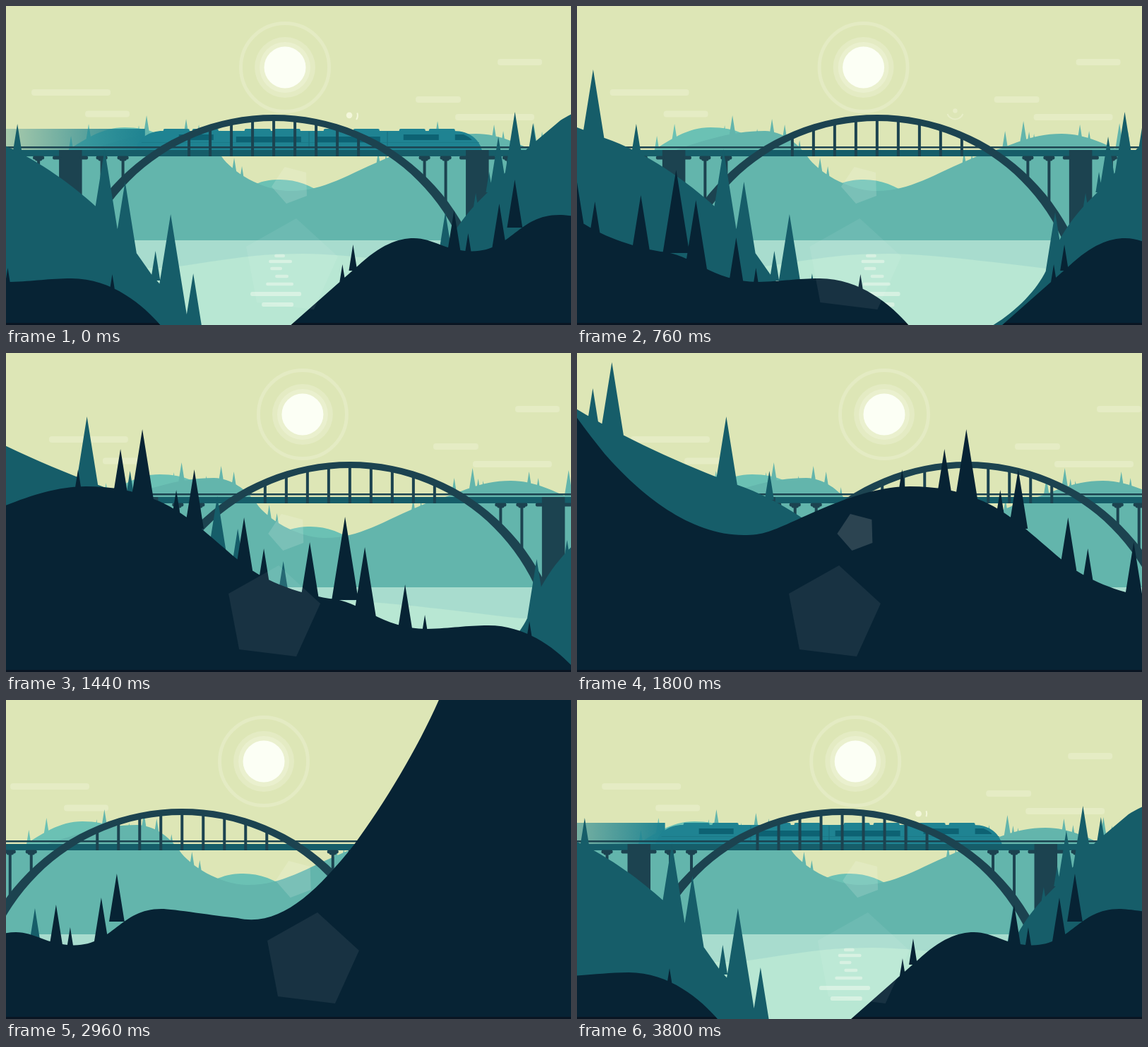
Recreate the animation shown at these times as an HTML page with a canvas. Size 800 px wide and 452 px high, loop 3840 ms.

```html
<!DOCTYPE html>
<html lang="en">
<head>
<meta charset="utf-8">
<title>Train over the arch bridge</title>
<style>
html, body { margin: 0; width: 100%; height: 100%; overflow: hidden; background: #dde6b6; }
canvas { display: block; }
</style>
</head>
<body>
<canvas id="stage" width="800" height="452"></canvas>
<script>
const ctx = document.getElementById('stage').getContext('2d');
const LOOP = 3.84, WRAP = 2.4;
const STEEL = '#1c4350', MID = '#165d69', FAR = '#63b5ac', BACK = '#6bc1b4';

// Camera pan: time (s), bridge offset (px), speed (px/s)
const PAN = [
  [-1.44, -282, 280], [-0.88, -130, 250], [0, 0, 88], [0.44, 28.9, 52],
  [1.08, 68, 85], [1.8, 173, 227], [2.28, 312, 383], [2.4, 360, 400]
];

function panAt(t) {
  let i = 0;
  while (i < PAN.length - 2 && t > PAN[i + 1][0]) i++;
  const [t0, p0, v0] = PAN[i], [t1, p1, v1] = PAN[i + 1];
  const d = t1 - t0, u = (t - t0) / d, u2 = u * u, u3 = u2 * u;
  return p0 + (p1 - p0) * (3 * u2 - 2 * u3) + d * v0 * (u3 - 2 * u2 + u) + d * v1 * (u3 - u2);
}

const ramp = (t, a, b) => Math.min(1, Math.max(0, (t - a) / (b - a)));
const white = a => `rgba(255,255,245,${a})`;

// Hill outline plus trees given as [x, top, base]
function land(outline, trees, slope = 0.16) {
  const path = new Path2D(outline);
  for (const [x, top, base] of trees) {
    const w = (base - top) * slope;
    path.addPath(new Path2D(`M${x - w} ${base}L${x} ${top}L${x + w} ${base}Z`));
  }
  return path;
}

const backHill = land('M82 208C110 190 135 172 168 172C205 172 225 184 260 208Z',
  [[92, 184, 206], [117, 167, 198], [131, 179, 194], [188, 169, 182]]);
const centreHill = new Path2D('M320 270C350 251 366 246 388 246C412 246 432 254 455 270Z');
const farHills = land(
  'M-300 333V208H108C150 193 195 177 245 177C270 178 290 193 305 213C320 235 362 261 400 262' +
  'C450 263 480 240 545 213L565 206C590 200 620 181 665 181C700 181 730 198 750 206H1100V333Z',
  [[199, 155, 186], [234, 174, 182], [255, 160, 186], [273, 168, 192], [294, 190, 212],
   [323, 215, 240], [334, 227, 248], [527, 207, 230], [538, 210, 222], [585, 177, 204],
   [611, 163, 198], [619, 178, 194], [626, 181, 192], [691, 168, 192], [704, 177, 192],
   [747, 166, 208], [759, 178, 208]]);
const shallows = new Path2D(
  'M-300 372L230 371C300 362 340 351 420 351C500 352 600 368 680 376H1100V452H-300Z');

const midLeft = land(
  'M-500 -60C-400 0 -320 40 -256 80C-190 120 -110 157 -29 187C30 207 90 250 127 284' +
  'L158 316L186 352L207 382L256 437L268 460H-500Z',
  [[-234, 50, 100], [-207, 13, 120], [-45, 90, 187], [16, 167, 208], [139.5, 203, 318],
   [168.5, 249, 353], [211.5, 347, 389], [233, 295, 437], [265, 379, 453]]);
const midRight = land(
  'M520 460C560 440 595 405 609 375L629 330C645 302 660 285 684 262C700 245 715 225 740 200' +
  'L785 162C800 152 830 138 870 132C910 130 950 140 1000 150V460Z',
  [[622, 292, 375], [665, 265, 290], [684, 235, 264], [697, 185, 262], [720.5, 150, 240], [746, 166, 200]]);
const nearRight = land(
  'M393 460L403 452L497 369C530 338 555 329 577 329C605 329 620 347 660 347.5' +
  'C715 347 725 296 783 296C800 296 860 306 891 309C950 322 1000 275 1056 205' +
  'C1100 145 1145 70 1176 0L1190 -30H2700V460Z',
  [[476, 366, 392], [491, 338, 375], [634, 290, 346], [654, 322, 350], [698, 280, 348], [720, 246, 314]]);
const nearLeft = land(
  'M-2800 460V-30H-1028L-1010 0C-980 50 -945 100 -910 143C-860 200 -790 258 -713 258' +
  'C-700 258 -690 257 -678 253C-640 241 -555 189 -478 189C-440 189 -410 195 -382 207' +
  'C-340 222 -300 262 -264 292C-230 322 -180 340 -133 348C-90 350 -60 391 5 391' +
  'C40 390 60 386 92 386C150 386 195 425 218 452V460Z',
  [[-489, 165, 193], [-429, 136, 197], [-398, 108, 207], [-350, 194, 230], [-324.5, 165, 249],
   [-254, 233, 308], [-226, 277, 322], [-161, 268, 346], [-111, 232, 350], [-83, 275, 375],
   [-26, 328, 391], [2, 371, 392], [150, 380, 415]]);

const train = new Path2D(
  'M182 204C186 186 202 177 220 177H632C656 177 668 190 672 204Z');
const trainWindows = new Path2D(
  'M243 182H292V190H243ZM324 185H416V193H324ZM436 185H528V193H436Z' +
  'M561 182H611V190H561ZM634 182H646Q654 185 658 190H634Z');
const bigFlare = new Path2D('M411 301L470 355L436 430L355 420L340 341Z');
const smallFlare = new Path2D('M394.500 228L425 236L426 269L397 280L376 256Z');

const nearFill = ctx.createLinearGradient(0, 0, 0, 452);
nearFill.addColorStop(0, '#072334');
nearFill.addColorStop(0.9925, '#072334');
nearFill.addColorStop(0.9926, '#0a1522');
nearFill.addColorStop(1, '#0a1522');

function layer(dx, draw) {
  ctx.save();
  ctx.translate(dx, 0);
  draw();
  ctx.restore();
}

function fill(path, color) {
  ctx.fillStyle = color;
  ctx.fill(path);
}

function box(color, x, y, w, h) {
  ctx.fillStyle = color;
  ctx.fillRect(x, y, w, h);
}

function disc(color, x, y, r) {
  ctx.fillStyle = color;
  ctx.beginPath();
  ctx.arc(x, y, r, 0, 7);
  ctx.fill();
}

function pill(color, x0, x1, y, h, r) {
  ctx.fillStyle = color;
  ctx.beginPath();
  ctx.roundRect(x0, y - h / 2, x1 - x0, h, r);
  ctx.fill();
}

function drawSky() {
  ctx.strokeStyle = white(0.2);
  ctx.lineWidth = 5;
  ctx.beginPath();
  ctx.arc(395, 87, 62.5, 0, 7);
  ctx.stroke();
  disc(white(0.2), 395, 87, 43);
  disc(white(0.22), 395, 87, 36);
  disc('#fcfff5', 395, 87, 29.5);
  for (const [x0, x1, y] of [[36, 148, 122.5], [112, 175, 153], [696, 759, 79.500], [580, 644, 132.5], [636, 748, 157.5]])
    pill(white(0.22), x0, x1, y, 9, 4);
}

// Dot with a turning, widening arc, tossed in a ballistic curve
function drawTossed(t) {
  if (t < -0.2 || t > 0.9) return;
  const x = 486 + 65 * t, y = 155 - 150 * t + 186 * t * t;
  const k = ramp(t, -0.04, 0.44), turn = k * Math.PI / 2, half = 0.35 + 0.85 * k;
  ctx.globalAlpha = 1 - ramp(t, 0.6, 0.9);
  disc('#f3f7da', x, y, 4.4 - 1.2 * k);
  ctx.strokeStyle = '#f3f7da';
  ctx.lineWidth = 2;
  ctx.beginPath();
  ctx.arc(x, y, 11.8, turn - half, turn + half);
  ctx.stroke();
  ctx.globalAlpha = 1;
}

function drawWater(pan) {
  box('#a8dcce', 0, 332, 800, 120);
  layer(pan * 0.46, () => fill(shallows, '#b8e7d3'));
  for (const [x0, x1, y] of [[380, 395, 354], [372, 405, 362], [374, 391, 372], [381, 400, 383],
    [368, 407, 394], [346, 418, 408], [362, 407, 423]]) {
    const dx = pan * (0.63 + (y - 354) * 0.0043);
    pill(white(0.4), x0 + dx, x1 + dx, y, y > 400 ? 6 : 4.5, 2.5);
  }
}

function drawTrain() {
  const trail = ctx.createLinearGradient(-75, 0, 195, 0);
  trail.addColorStop(0, 'rgba(31,131,145,0)');
  trail.addColorStop(1, 'rgba(31,131,145,1)');
  box(trail, -75, 174, 270, 30);
  fill(train, '#1f8392');
  for (const x of [221, 262, 336, 378, 448, 490, 555, 597])
    pill('#1f8392', x, x + 37, 177, 6, 2);
  box('#1b7987', 190, 193, 478, 1);
  for (const x of [316, 427, 538]) box('#1b7483', x - 0.5, 178, 1.5, 24);
  fill(trainWindows, '#0d6273');
}

function drawBridge(t) {
  if (t > -0.6 && t < 0.7) layer(1715 * t, drawTrain);
  box(MID, -700, 204, 2300, 9);
  box(STEEL, -700, 199, 2300, 2.5);
  for (const x of [75, 651]) box(STEEL, x, 204, 32.5, 150);
  for (const x of [16, 46, 135.5, 165.5, 592.5, 622.5, 711, 741]) {
    const dx = Math.abs(x - 379);
    const foot = dx < 270 ? 464 - Math.sqrt(308 * 308 - dx * dx) : 330;
    box(STEEL, x - 2, 213, 4, foot - 211);
    pill(STEEL, x - 8, x + 8, 215, 5, 2);
    pill(STEEL, x - 5, x + 5, 217.5, 4, 2);
  }
  for (const x of [72, 110, 648, 687]) pill(STEEL, x - 6, x + 6, 215, 5, 2);
  for (let i = 0; i < 9; i++) {
    const x = 259 + 30 * i, dx = x - 379;
    const top = 450 - Math.sqrt(289 * 289 - dx * dx);
    box(STEEL, x - 2, top, 4, 213 - top);
  }
  ctx.fillStyle = STEEL;
  ctx.beginPath();
  ctx.arc(379, 462, 308, Math.PI, 0);
  ctx.arc(379, 452, 289, 0, Math.PI, true);
  ctx.fill();
}

function draw(seconds) {
  let t = seconds % LOOP;
  if (t > WRAP) t -= LOOP;
  const pan = panAt(t), sky = pan * 0.231;

  box('#dde6b6', 0, 0, 800, 452);
  layer(sky, drawSky);
  drawTossed(t);
  layer(pan * 0.4, () => fill(centreHill, BACK));
  layer(pan * 0.46, () => {
    fill(backHill, BACK);
    fill(farHills, FAR);
  });
  drawWater(pan);
  layer(pan, () => drawBridge(t));
  layer(pan * 1.2, () => fill(midRight, MID));
  layer(pan * 1.48, () => fill(midLeft, MID));
  layer(pan * 4.34, () => fill(nearRight, nearFill));
  layer(pan * 5.48, () => fill(nearLeft, nearFill));

  // Lens flares are lit only while the sun is uncovered
  ctx.globalAlpha = ramp(t, -1.12, -0.96) * (1 - ramp(t, 1.95, 2.2));
  layer(-sky, () => fill(bigFlare, white(0.065)));
  layer(-sky * 0.19, () => fill(smallFlare, white(0.15)));
  ctx.globalAlpha = 1;
}

function tick() {
  draw(performance.now() / 1000);
  requestAnimationFrame(tick);
}
tick();
</script>
</body>
</html>
```
